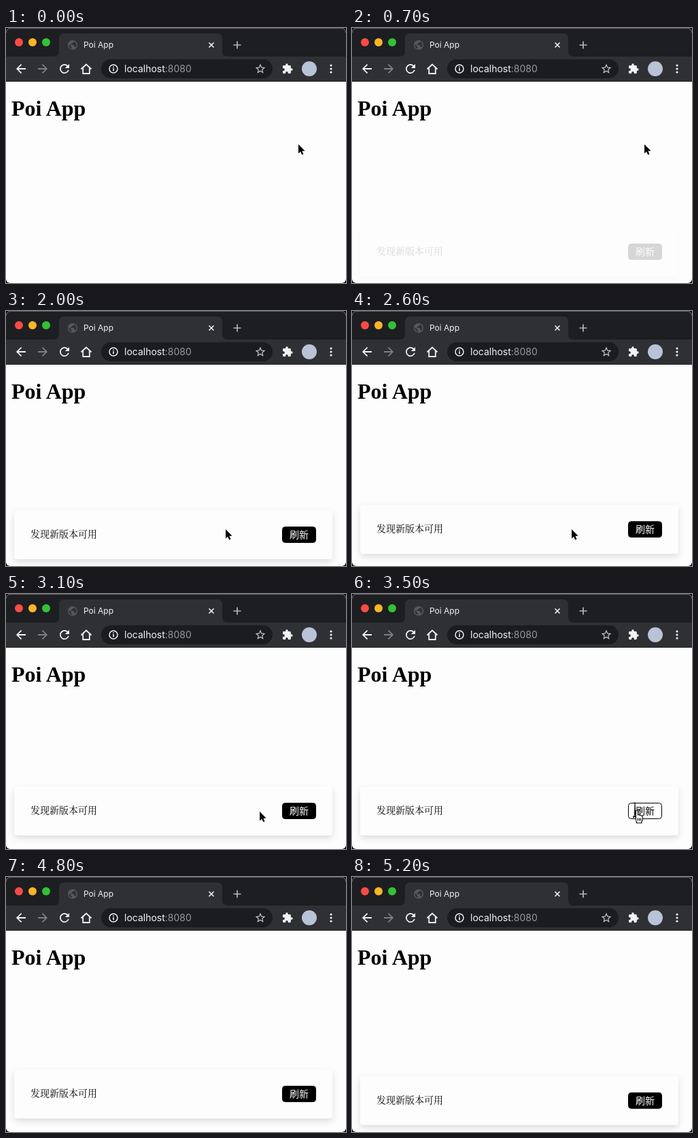
An HTML page for the animation above (5300 ms loop, 500x375 px).

```html
<!DOCTYPE html>
<html lang="zh">
<head>
<meta charset="utf-8">
<title>Poi App</title>
<style>
  html, body { margin: 0; width: 100%; height: 100%; overflow: hidden; background: #000; }
  svg { display: block; width: 500px; height: 375px; }
  .ui { font-family: Inter, Roboto, sans-serif; }
  .cjk { font: 14px "Noto Sans CJK SC", "Noto Sans CJK", sans-serif; }
  .note { font-family: "Noto Serif CJK SC", "Noto Sans CJK SC", "Noto Sans CJK", serif; }
  #panel { filter: drop-shadow(0 4px 5px rgba(0, 0, 0, .13)); }
</style>
</head>
<body>
<svg viewBox="0 0 500 375">
  <defs>
    <clipPath id="window"><rect width="500" height="375" rx="6"/></clipPath>
  </defs>
  <g clip-path="url(#window)">
    <rect width="500" height="375" fill="#fefdfe"/>

    <!-- browser chrome -->
    <rect width="500" height="43" fill="#1d1e21"/>
    <path d="M0 42H70Q78 42 78 34V16Q78 8 86 8H310Q318 8 318 16V34Q318 42 326 42H500V79H0Z" fill="#2f3034"/>
    <path d="M0 78.5H500" stroke="#242529"/>
    <path d="M.5 7Q.5 .5 7 .5H493Q499.5 .5 499.5 7" fill="none" stroke="#5d5f62"/>
    <circle cx="19" cy="21" r="6" fill="#fc4b47"/>
    <circle cx="39" cy="21" r="6" fill="#fdb528"/>
    <circle cx="59" cy="21" r="6" fill="#32c236"/>
    <rect x="140" y="46" width="252" height="28" rx="14" fill="#1b1c20"/>
    <g id="icons"></g>
    <g fill="none" stroke="#f1f2f3" stroke-width="1.8">
      <path d="M298.5 21.5l7 7m0-7l-7 7" stroke-width="1.6"/>
      <path d="M340 19.5v11m-5.500-5.500h11" stroke="#b5b7ba" stroke-width="1.7"/>
      <path d="M110.500 60.500L118 53.500L125.500 60.500M113.200 59V67H122.800V59"/>
      <circle cx="158" cy="60" r="6" stroke-width="1.500"/>
      <path d="M158 59v4.300m0-6.800v1.500" stroke-width="1.600"/>
    </g>
    <circle cx="446" cy="60" r="11" fill="#b9c3d8"/>
    <g fill="#f1f2f3">
      <circle cx="478" cy="55" r="1.600"/>
      <circle cx="478" cy="60" r="1.600"/>
      <circle cx="478" cy="65" r="1.600"/>
    </g>
    <g class="ui" fill="#f1f2f3">
      <text x="114" y="29" font-size="12">Poi App</text>
      <text x="174" y="65" font-size="14">localhost<tspan fill="#96999e">:8080</tspan></text>
    </g>

    <!-- page -->
    <text x="8" y="129" style="font:bold 32px 'Liberation Serif',serif">Poi App</text>
    <g id="card">
      <rect id="panel" x="12" y="293" width="468" height="72" rx="4" fill="#fefdfe"/>
      <text class="cjk note" x="36" y="333">发现新版本可用</text>
      <rect id="button" x="406.500" y="317.500" width="49" height="23" rx="4" stroke="#000"/>
      <text id="label" class="cjk" x="417" y="334" font-weight="500">刷新</text>
    </g>

    <g id="cursor" stroke-linejoin="round">
      <path id="arrow" d="M0 0V13.500L3.100 10.700L5.200 15.400L7.500 14.400L5.400 9.800H9.600Z"
            stroke="#fff" stroke-width="2" paint-order="stroke"/>
      <path id="hand" fill="#fff" stroke="#000" stroke-width="1.100"
            d="M-1.500 1Q-1.500-.7 0-.7T1.500 1V6Q3.300 4.800 4 6.600Q5.800 5.800 6.400 7.500Q8.500 7 8.500 9.300V12Q8.500 14 7 15.500V17.700H-.6V16.200Q-2 14.500-3-12.500Q-3 12.500-5.200 9.400Q-5.600 7.700-4 7.800Q-2.800 8-1.500 10ZM1.300 10.500V14.500M3.600 10.500V14.500M5.800 10.500V14.500"/>
    </g>
  </g>
</svg>
<script>
const $ = id => document.getElementById(id);
const LOOP = 5300, STEP = 100;

// Icons on a 24-unit grid: centre x, centre y, scale, colour, path
const icons = [
  [98, 25, .7, "#56585c", "M12 2C6.480 2 2 6.480 2 12s4.480 10 10 10 10-4.480 10-10S17.520 2 12 2zm-1 17.930c-3.950-.49-7-3.850-7-7.930 0-.62.08-1.210.21-1.790L9 15v1c0 1.100.9 2 2 2v1.930zm6.900-2.540c-.26-.81-1-1.390-1.900-1.390h-1v-3c0-.55-.45-1-1-1H8v-2h2c.55 0 1-.45 1-1V7h2c1.100 0 2-.9 2-2v-.41c2.930 1.190 5 4.060 5 7.410 0 2.080-.8 3.970-2.100 5.390z"],
  [22, 60, .88, "#f1f2f3", "M20 11H7.830l5.590-5.590L12 4l-8 8 8 8 1.410-1.410L7.830 13H20z"],
  [54, 60, .88, "#7e8084", "M12 4l-1.410 1.410L16.170 11H4v2h12.170l-5.580 5.590L12 20l8-8z"],
  [86, 60, .88, "#f1f2f3", "M17.650 6.350A8 8 0 1 0 19.730 14H17.650A6 6 0 1 1 16.220 7.780L13 11h7V4z"],
  [374, 60, .74, "#c3c5c8", "M22 9.240l-7.190-.62L12 2 9.190 8.630 2 9.240l5.460 4.730L5.820 21 12 17.270 18.180 21l-1.630-7.030zM12 15.400l-3.760 2.270 1-4.280-3.320-2.880 4.380-.38L12 6.100l1.710 4.040 4.380.38-3.320 2.880 1 4.280z"],
  [414, 60, .7, "#f1f2f3", "M20.500 11H19V7c0-1.100-.9-2-2-2h-4V3.500a2.500 2.500 0 0 0-5 0V5H4c-1.100 0-2 .9-2 2v3.800h1.500a2.700 2.700 0 0 1 0 5.400H2V20c0 1.100.9 2 2 2h3.800v-1.500a2.700 2.700 0 0 1 5.400 0V22H17c1.100 0 2-.9 2-2v-4h1.500a2.500 2.500 0 0 0 0-5z"]
];
$("icons").innerHTML = icons.map(([x, y, s, fill, d]) =>
  `<path transform="translate(${x} ${y}) scale(${s}) translate(-12 -12)" fill="${fill}" fill-rule="evenodd" d="${d}"/>`).join("");

const part = (t, start, length) => Math.min(1, Math.max(0, (t - start) / length));
const smooth = u => u * u * (3 - 2 * u);
const mix = (a, b, u) => a + (b - a) * u;

// CSS "ease": cubic-bezier(.25, .1, .25, 1)
function ease(x) {
  if (x <= 0 || x >= 1) return x;
  const curve = (a, b, s) => 3 * a * s * (1 - s) ** 2 + 3 * b * s * s * (1 - s) + s ** 3;
  let lo = 0, hi = 1;
  for (let i = 0; i < 24; i++) {
    const mid = (lo + hi) / 2;
    if (curve(.25, .25, mid) < x) lo = mid; else hi = mid;
  }
  return curve(.1, 1, lo);
}

function cursorAt(t) {
  const toCard = smooth(part(t, 1440, 560));
  const toButton = smooth(part(t, 2750, 680));
  const away = part(t, 4450, 310) ** 2;
  return [
    mix(mix(430, 323, toCard), 419, toButton),
    mix(mix(mix(171, 321, toCard), 319, toButton), 381, away)
  ];
}

function draw(t) {
  const lift = ease(part(t, 2360, 500)) - ease(part(t, 4795, 500));
  $("card").setAttribute("opacity", ease(part(t, 660, 300)));
  $("card").setAttribute("transform", `translate(0 ${-10 * lift})`);

  const invert = ease(part(t, 3275, 200)) - ease(part(t, 4587, 200));
  const grey = u => `rgb(${[1, 1, 1].map(() => Math.round(254 * u))})`;
  $("button").setAttribute("fill", grey(invert));
  $("label").setAttribute("fill", grey(1 - invert));

  const [x, y] = cursorAt(t);
  const over = x >= 406 && x <= 456 && y >= 307 && y <= 331;
  $("cursor").setAttribute("transform", `translate(${x} ${y})`);
  $("cursor").setAttribute("visibility", t < 4760 ? "visible" : "hidden");
  $("arrow").style.display = over ? "none" : "";
  $("hand").style.display = over ? "" : "none";
}

const begin = performance.now();
function tick() {
  const t = (performance.now() - begin) % LOOP;
  draw(Math.floor(t / STEP) * STEP);
  requestAnimationFrame(tick);
}
tick();
</script>
</body>
</html>
```
